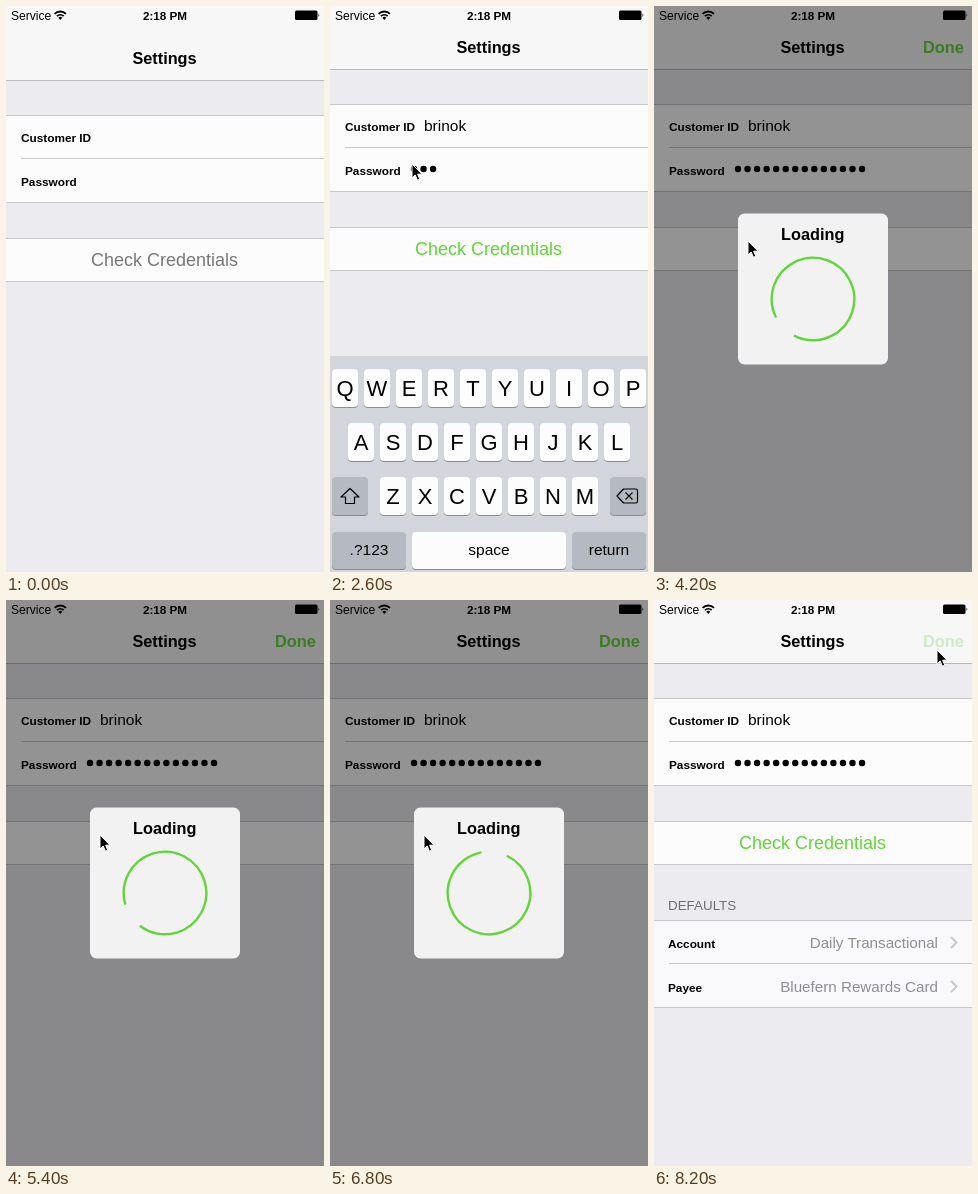
An HTML page that plays this animation: 318 by 566 pixels, repeating every 8.4 s.

```html
<!DOCTYPE html>
<html lang="en">
<head>
<meta charset="utf-8">
<title>Settings</title>
<style>
  html, body { margin: 0; width: 100%; height: 100%; overflow: hidden; background: #ebebf0; }
  svg { display: block; width: 100%; height: 100%; }
  text { font-family: "Liberation Sans", Arial, sans-serif; fill: #000; }
  .bold { font-weight: 700; }
  .label { font-weight: 700; font-size: 11.8px; }
  .title { font-weight: 700; font-size: 16.3px; }
  .value { font-size: 15.2px; fill: #8e8e93; text-anchor: end; }
  .mid { text-anchor: middle; }
  .cell { fill: #fcfcfc; }
  .line { stroke: #c8c7cc; stroke-width: 1; }
  .letter { font-size: 22px; text-anchor: middle; }
  .word { font-size: 15.5px; text-anchor: middle; }
  .icon { fill: none; stroke: #000; stroke-width: 1.2; stroke-linejoin: round; }
  .chevron { fill: none; stroke: #c7c7cc; stroke-width: 2; }
  .green { fill: #5fd835; }
</style>
</head>
<body>
<svg viewBox="0 0 318 566">
  <rect width="318" height="566" fill="#ebebf0"/>

  <g id="page">
    <rect y="-20" width="318" height="83" fill="#f7f7f7"/>
    <path class="line" d="M0 63.5H318" style="stroke:#b9b9bc"/>
    <text class="title mid" x="158.5" y="47">Settings</text>
    <text id="done" class="bold" x="269" y="47" font-size="16.4">Done</text>

    <rect class="cell" y="98" width="318" height="88"/>
    <path class="line" d="M0 98.5H318M15 141.5H318M0 185.5H318"/>
    <text class="label" x="15" y="124.5">Customer ID</text>
    <text class="label" x="15" y="168.5">Password</text>
    <text id="user" x="94" y="125" font-size="15.5"></text>
    <g id="dots"></g>

    <g id="check">
      <rect class="cell" y="221" width="318" height="44"/>
      <path class="line" d="M0 221.5H318M0 264.5H318"/>
      <text id="checkText" class="mid" x="158.5" y="249.3" font-size="18">Check Credentials</text>
    </g>

    <g id="defaults">
      <rect y="320" width="318" height="88" fill="#f9f9fb"/>
      <path class="line" d="M0 320.5H318M15 363.5H318M0 407.5H318"/>
      <g id="defaultsText">
        <text x="14" y="310" font-size="13.4" style="fill:#6d6d72">DEFAULTS</text>
        <text class="label" x="14" y="347.5">Account</text>
        <text class="label" x="14" y="391.5">Payee</text>
        <text class="value" x="284" y="348">Daily Transactional</text>
        <text class="value" x="284" y="392">Bluefern Rewards Card</text>
        <path class="chevron" d="M297 337l5.5 5.5l-5.5 5.5M297 381l5.5 5.5l-5.5 5.5"/>
      </g>
    </g>
  </g>

  <g id="status">
    <text x="5" y="13.8" font-size="12.1">Service</text>
    <g fill="none" stroke="#000" stroke-width="1.8">
      <path d="M48.6 7.8a8.2 8.2 0 0 1 11.4 0M50.9 10.2a4.9 4.9 0 0 1 6.8 0"/>
    </g>
    <path d="M54.3 14l-2-2.2a2.9 2.9 0 0 1 4 0z"/>
    <text class="bold mid" x="159" y="13.8" font-size="11.7">2:18 PM</text>
    <rect x="289" y="4.5" width="22.5" height="9.5" rx="1.5"/>
    <path d="M312.5 7.5q1.8 1.7 0 3.6z"/>
  </g>

  <g id="keyboard">
    <rect y="350" width="318" height="216" fill="#d2d5db"/>
    <g id="keys"></g>
    <path class="icon" d="M20 482.5l9 8.5h-4.5v6.5h-9v-6.5h-4.5z"/>
    <path class="icon" d="M287 490l6.5-7h12.5q1.5 0 1.5 1.5v11q0 1.5-1.5 1.5h-12.5zM295.5 486.5l7 7M302.5 486.5l-7 7"/>
  </g>

  <rect id="dim" width="318" height="566"/>

  <g id="hud">
    <rect id="hudBox" x="84" y="207.5" width="150" height="151" rx="6.5" fill="#f2f2f3"/>
    <text class="title mid" x="158.7" y="233.7">Loading</text>
    <circle id="ring" cx="159" cy="293" r="41.3" fill="none" stroke="#5fd835" stroke-width="2.4"
            pathLength="100" stroke-dasharray="90 10"/>
  </g>

  <path id="pointer" d="M0 0v14l3.2-3l2.2 5.2l2.4-1l-2.2-5h4.4z" stroke="#fff" stroke-width="1" stroke-linejoin="round"/>
</svg>

<script>
const LOOP = 8400, STEP = 200, USER = 'brinok', DOTS = 14;
const NS = 'http://www.w3.org/2000/svg';
const $ = id => document.getElementById(id);

function add(parent, tag, attrs, text) {
  const el = document.createElementNS(NS, tag);
  for (const name in attrs) el.setAttribute(name, attrs[name]);
  if (text) el.textContent = text;
  return parent.appendChild(el);
}

function addKey(x, y, w, h, fill, label, cls) {
  add($('keys'), 'rect', { x, y: y + 1, width: w, height: h, rx: 4, fill: '#898c91' });
  add($('keys'), 'rect', { x, y, width: w, height: h, rx: 4, fill });
  const base = y + h / 2 + (cls === 'letter' ? 8 : 4.5);
  if (label) add($('keys'), 'text', { x: x + w / 2, y: base, class: cls }, label);
}

[['QWERTYUIOP', 15, 363], ['ASDFGHJKL', 31, 417], ['ZXCVBNM', 63, 471]].forEach(([row, x, y]) =>
  [...row].forEach((c, i) => addKey(x + i * 32 - 13, y, 26, 38, '#fcfcfc', c, 'letter')));
const GREY = '#b5b9c1';
addKey(2, 471, 36, 38, GREY);
addKey(280, 471, 36, 38, GREY);
addKey(2, 526, 74, 37, GREY, '.?123', 'word');
addKey(82, 526, 154, 37, '#fcfcfc', 'space', 'word');
addKey(242, 526, 74, 37, GREY, 'return', 'word');

for (let i = 0; i < DOTS; i++) add($('dots'), 'circle', { cx: 84 + i * 9.54, cy: 163, r: 3.2 });

// Linear interpolation through [time, value] points, held at both ends.
function track(t, points) {
  if (t <= points[0][0]) return points[0][1];
  for (let i = 1; i < points.length; i++) {
    const [t0, v0] = points[i - 1], [t1, v1] = points[i];
    if (t <= t1) return v0 + (v1 - v0) * (t - t0) / (t1 - t0);
  }
  return points[points.length - 1][1];
}

const set = (id, name, value) => $(id).setAttribute(name, value);
const show = (id, on) => set(id, 'visibility', on ? 'visible' : 'hidden');
const shift = (id, x, y) => set(id, 'transform', `translate(${x} ${y})`);

function draw(t) {
  shift('page', 0, track(t, [[200, 11], [600, 0]]));
  shift('keyboard', 0, t < 3800 ? track(t, [[200, 216], [600, 0]]) : track(t, [[3800, 0], [4200, 216]]));

  $('user').textContent = USER.slice(0, Math.floor(track(t, [[600, 0], [1200, USER.length]])));
  const typed = Math.round(track(t, [[2400, 0], [3400, DOTS]]));
  [...$('dots').children].forEach((dot, i) => dot.setAttribute('visibility', i < typed ? 'visible' : 'hidden'));
  $('checkText').style.fill = typed ? '#5fd835' : '#77777a';
  show('check', t !== 3800);

  show('done', t >= 3800);
  $('done').style.fill = t >= 8200 ? '#cdebc2' : '#5fd835';

  const loading = t >= 3800 && t < 7200;
  show('hud', loading);
  set('dim', 'opacity', loading ? track(t, [[3800, 0], [4000, 0.42]]) : 0);
  const scale = track(t, [[3800, 1.3], [4000, 1]]);
  set('hud', 'transform', `translate(159 283) scale(${scale}) translate(-159 -283)`);
  set('hud', 'opacity', track(t, [[3800, 0.6], [4000, 1]]));
  set('hudBox', 'opacity', track(t, [[3800, 0.1], [4000, 1]]));
  set('ring', 'transform', `rotate(${(t - 3800) / STEP * 121.7 - 90} 159 293)`);

  show('defaults', t >= 7200);
  set('defaultsText', 'opacity', track(t, [[7200, 0.5], [7400, 1]]));

  show('pointer', t >= 200 && (t < 800 || t >= 1400));
  const x = track(t, [[1400, 82], [2600, 82], [3400, 94], [7200, 94], [8000, 283]]);
  const y = track(t, [[600, 118], [1400, 158], [2600, 158], [3400, 235], [7200, 235], [8000, 50]]);
  shift('pointer', x, y);
}

const start = performance.now();
function tick() {
  const t = (performance.now() - start) % LOOP;
  draw(Math.floor(t / STEP) * STEP);
  requestAnimationFrame(tick);
}
tick();
</script>
</body>
</html>
```
